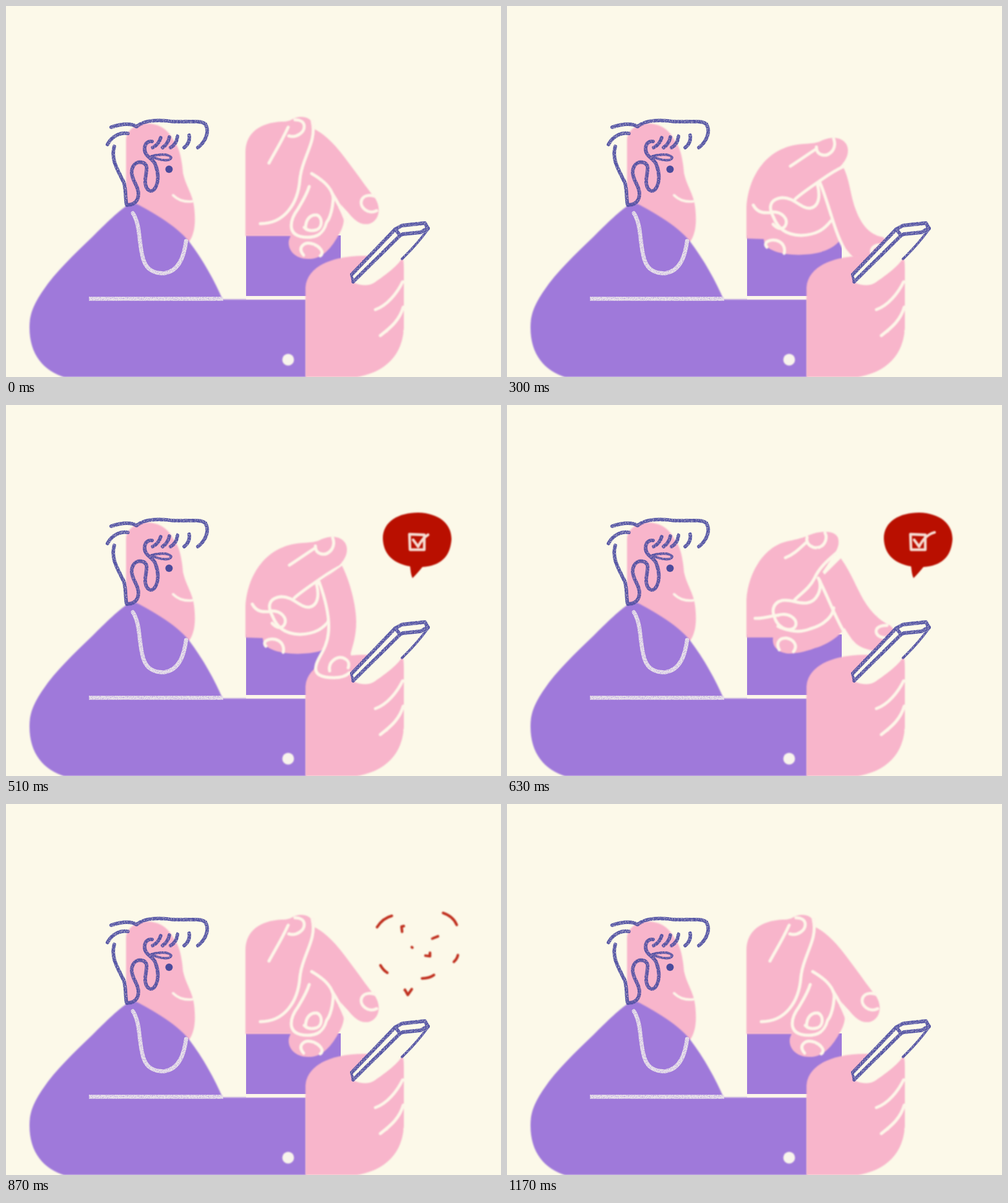
These frames come from a looping animation (800x600 px, 1.2 s). An HTML page:

```html
<!DOCTYPE html>
<html lang="en">
<head>
<meta charset="utf-8">
<title>Phone tap</title>
<style>
  html, body { margin: 0; width: 100%; height: 100%; overflow: hidden; background: #fcf9e9; }
  svg { display: block; width: 100vw; height: 100vh; }
  path { stroke-linecap: round; stroke-linejoin: round; }
  .pink { fill: #f8b5cb; }
  .purple { fill: #9f79da; }
  .paper { fill: #fcf9e9; }
  .ink { fill: none; stroke: #5252a3; stroke-width: 5.8; }
  .line { fill: none; stroke: #fdf6e9; stroke-width: 5; }
  .chalk { fill: none; stroke: #e9e3e9; stroke-width: 6.5; }
  .thin { stroke-width: 4; }
  .red { fill: #b90f00; }
  .mark { fill: none; stroke: #f6dcd2; stroke-width: 4.4; }
  .spark { fill: none; stroke: #c0301f; stroke-width: 4.6; }
</style>
</head>
<body>
<svg viewBox="0 0 800 600">
  <defs>
    <filter id="soft" filterUnits="userSpaceOnUse" x="0" y="0" width="800" height="600" color-interpolation-filters="sRGB">
      <feTurbulence type="fractalNoise" baseFrequency=".2" numOctaves="2" seed="3" result="n"/>
      <feDisplacementMap in="SourceGraphic" in2="n" scale="1.4" xChannelSelector="R" yChannelSelector="G"/>
      <feGaussianBlur stdDeviation=".9"/>
    </filter>
    <filter id="crayon" filterUnits="userSpaceOnUse" x="0" y="0" width="800" height="600" color-interpolation-filters="sRGB">
      <feTurbulence type="fractalNoise" baseFrequency=".55" numOctaves="2" seed="8" result="n"/>
      <feDisplacementMap in="SourceGraphic" in2="n" scale="1.6" xChannelSelector="R" yChannelSelector="G" result="d"/>
      <feColorMatrix in="n" values="0 0 0 0 0  0 0 0 0 0  0 0 0 0 0  1.6 0 0 0 .1" result="g"/>
      <feComposite in="d" in2="g" operator="in"/>
      <feGaussianBlur stdDeviation=".6"/>
    </filter>
  </defs>

  <!-- head -->
  <g filter="url(#soft)">
    <path class="pink" d="M194 330L194 216C195 200 210 190 230 190C248 191 262 200 270 216C280 228 284 245 286 270C290 290 302 305 304 325C307 350 305 368 296 381L250 375Z"/>
    <path class="line thin" d="M270 306Q282 318 301 316"/>
  </g>

  <!-- far arm and hand -->
  <path class="purple" d="M388 371H541V469H388Z"/>
  <g filter="url(#soft)">
    <path id="palm" class="pink"/>
    <g id="back"><g id="index">
      <path id="finger" class="pink"/>
      <path id="edge" class="line"/>
      <path id="tipNail" class="line"/>
    </g></g>
    <g id="creases"></g>
  </g>

  <!-- body and near arm -->
  <g filter="url(#soft)">
    <path class="purple" d="M200 320C184 329 160 353 140 373C110 402 80 430 60 460C43 485 38 500 38 520C38 565 62 592 100 602H485V474.500H350C338 446 318 410 296 381C278 359 250 341 215 322Q207 317 200 320Z"/>
    <circle cx="456" cy="572" r="9.500" fill="#f8f4ec"/>
  </g>
  <g filter="url(#crayon)">
    <path class="chalk" d="M205 335C218 355 214 385 222 410C228 430 245 433 257 432C280 428 288 405 291 380"/>
    <path class="chalk" style="stroke-linecap:butt" d="M134 473.500H351"/>
  </g>
  <path d="M388 472H484" class="line" style="stroke-linecap:butt"/>

  <!-- ink on the head -->
  <g class="ink" filter="url(#crayon)">
    <path d="M170 196C185 191 201 189 211 195C225 183 250 184 270 187C295 188 315 184 322 191C330 203 322 220 310 229"/>
    <path d="M164 224C170 212 183 204 197 206"/>
    <path d="M175 227C168 250 184 270 191 287C194 300 193 315 195 322C206 322 214 316 214 304C214 290 204 284 203 269C204 254 214 250 223 254C232 260 224 274 225 285C226 298 234 302 239 297C247 288 247 272 242 258C239 246 224 245 224 231C224 222 230 218 236 219"/>
    <path d="M250 213Q247 224 237 229M264 212Q262 223 253 229M277 211Q276 223 266 229M296 209Q298 221 288 229"/>
    <path class="thin" d="M235 243C246 240 262 238 267 245C266 252 250 250 236 244"/>
  </g>
  <circle id="eye" cx="263.500" cy="264" r="6" fill="#4a4a9c"/>
  <path id="lid" class="ink thin" d="M258 263Q260 270 265 270Q269 269 270 262"/>

  <!-- near hand and phone -->
  <g filter="url(#soft)">
    <path class="pink" d="M484 602V455C486 425 520 404 580 404L640 405Q643 410 643 425V520C641 565 612 598 550 602Z"/>
    <path class="line" d="M597 491C615 485 632 465 641 446M605 533C622 520 636 508 642 487"/>
  </g>
  <g id="front" filter="url(#soft)"></g>
  <path class="paper" filter="url(#soft)" d="M557 434L629 361L640 354L677 350L683 360L640 408C632 422 610 437 596 447Q582 456 561 447Z"/>
  <g class="ink" filter="url(#crayon)">
    <path d="M559 434L629 361L640 355L677 351L682 360"/>
    <path d="M561 446L637 371L629 361M637 371L641 369L670 366L682 359"/>
    <path class="thin" d="M682 361Q664 386 640 409M558 434L561 446"/>
  </g>

  <g id="bubble" filter="url(#soft)">
    <g id="grow">
      <path id="balloon" class="red"/>
      <path id="box" class="mark"/>
      <path id="tick" class="mark" pathLength="1" d="M658 218L666 229C672 217 680 209 691 206"/>
    </g>
  </g>
  <g id="burst" class="spark" filter="url(#soft)"></g>
</svg>

<script>
const LOOP = 1200, STEP = 30;
const $ = id => document.getElementById(id);

// Each shape lists its poses: raised, reaching, pressed, swiped.
const palm = [
  'M387 372C387 330 387 280 387 235C388 205 410 189 445 187C456 187 459 185 463 183C475 176 492 179 495 190C497 215 505 240 520 280C549 330 550 345 541 364C530 385 515 409 490 409C468 410 455 395 457 380C458 376 459 374 460 372Z',
  'M387 376C387 350 387 330 387 315C389 274 414 228 455 220C470 217 480 214 487 211C505 203 530 202 535 215C539 230 530 240 510 270C552 325 558 335 551 350C545 370 520 387 498 393C480 400 465 402 455 402C435 400 428 388 430 376Z',
  'M387 376C387 360 387 340 387 325C390 275 420 226 480 223C495 222 500 222 510 217C530 208 552 215 551 235C550 250 540 260 508 288C525 320 535 350 538 379C525 396 500 401 480 402C470 403 460 402 450 401C428 397 415 390 415 377Z'
];
const finger = [
  'M490 195C520 207 540 235 560 262C575 282 585 297 596 310C608 328 602 347 588 352C572 356 562 345 552 333C535 315 515 290 494 271Z',
  'M536 236C552 252 568 270 583 288C597 306 616 322 632 337C650 355 640 375 620 378C600 380 585 375 572 363C547 340 520 305 503 280Z',
  'M543 260C553 280 553 300 560 325C568 350 580 372 606 376C630 395 615 420 600 420C570 415 555 412 545 398C530 365 520 320 506 286Z',
  'M543 260C556 285 566 325 566 350C566 375 560 390 557 402C562 425 552 441 530 441C510 441 498 436 501 422C505 398 542 385 506 286Z'
];
const edge = [
  'M527 303C535 315 542 328 549 347C549 348 550 348 550 349C550 350 551 350 551 351',
  'M503 280C520 305 535 330 552 350C556 354 558 356 560 358C561 359 562 360 563 361',
  'M506 286C520 320 528 365 545 396C549 401 551 404 553 406C555 408 556 409 557 410',
  'M506 286C542 385 505 398 501 422C498 436 510 441 530 441C540 441 550 438 555 433'
];
const tipNail = [
  'M599 331C585 338 570 325 575 313C580 304 592 306 597 308',
  'M627 340C610 345 602 335 606 328C611 322 618 323 622 322',
  'M608 412C590 412 585 402 590 395C595 390 602 390 606 391',
  'M523 430C520 415 535 406 545 409C552 412 556 416 553 425'
];
const creases = [
  // thumb top
  ['M425 254C437 232 446 218 456 196', 'M450 247C465 241 475 230 485 221', 'M458 259C472 250 486 240 500 231'],
  // thumb nail
  ['M457 210C470 214 482 204 482 195C482 188 476 184 467 184', 'M485 214C482 226 495 233 505 230C515 226 518 214 514 207', 'M500 228C500 242 515 244 522 238C530 232 531 222 528 215'],
  // thumb underside
  ['M495 187C503 220 478 245 475 280C472 320 450 352 411 352', 'M535 237C520 250 505 262 497 280C490 295 475 305 465 315', 'M543 260C525 268 510 280 498 288C485 297 475 304 466 312'],
  // knuckle
  ['M494 271C515 283 527 295 529 310', 'M503 280C504 281 505 283 506 285', 'M505 286C505 287 506 288 506 289'],
  // curled finger
  ['M490 292C486 305 478 318 472 328C466 336 461 345 461 355C461 368 470 374 488 374C505 374 514 366 518 350C526 340 528 325 529 310',
   'M505 284C509 300 500 318 485 320C470 322 460 314 445 316C428 320 428 335 433 345C440 366 470 370 490 362C515 355 527 340 528 328',
   'M502 290C507 310 503 325 490 327C475 328 465 310 445 310C425 312 422 325 430 340C438 360 450 370 475 371C500 370 512 362 523 348'],
  // curled nail
  ['M484 360C484 345 492 337 502 338C512 341 512 358 502 362C495 364 489 364 484 360', 'M438 340C455 335 468 345 467 355C465 364 455 364 448 362C444 361 441 360 438 358', 'M428 333C445 332 455 345 450 355C447 361 440 361 436 358C434 357 432 355 430 353'],
  // fold
  ['M482 358C483 358 484 358 484 359', 'M401 345C415 346 430 340 438 340', 'M398 322C405 335 415 335 428 334'],
  // little finger nail
  ['M481 403C470 390 482 382 493 384C508 388 515 399 508 404', 'M440 396C434 385 440 376 452 377C465 380 470 390 463 399', 'M420 390C413 382 425 377 435 379C447 382 450 392 448 400']
];
const balloon = [
  'M620 228C618 200 640 191 668 191C698 190 715 205 714 228C712 250 700 262 673 264C668 275 660 287 654 297C652 285 653 275 652 263C632 258 621 247 620 228Z',
  'M609 216C609 188 635 174 666 174C700 175 720 192 720 217C718 246 702 260 673 262C668 268 662 275 657 280C654 273 654 267 653 261C625 256 610 241 609 216Z'
];
const box = ['M661 223L674 224L673 237L660 236Z', 'M652 209L676 210L676 234L653 234Z'];
const sparks = [
  'M594 197Q604 181 620 177', 'M710 172Q728 178 734 193', 'M600 264Q605 273 612 277',
  'M673 287Q686 287 694 281', 'M729 258Q735 252 736 246', 'M643 307L648 316L655 306',
  'M638 205L637 196L641 195', 'M691 217L701 213', 'M655 232L656 233', 'M679 247L687 248L687 242'
];

const clamp = x => Math.min(1, Math.max(0, x));
const span = (t, a, b) => clamp((t - a) / (b - a));
const ease = x => x * x * (3 - 2 * x);
const lerp = (a, b, k) => a + (b - a) * k;

// Blends neighbouring path poses number by number.
function morph(poses, p) {
  const i = Math.min(Math.floor(p), poses.length - 2), k = p - i;
  const to = poses[i + 1].match(/[\d.]+/g);
  let n = 0;
  return poses[i].replace(/[\d.]+/g, v => lerp(+v, +to[n++], k).toFixed(2));
}
const draw = (el, poses, p) => el.setAttribute('d', morph(poses, p));
const show = (el, on) => el.style.display = on ? '' : 'none';

function add(parent, cls) {
  const el = document.createElementNS('http://www.w3.org/2000/svg', 'path');
  if (cls) el.setAttribute('class', cls);
  return parent.appendChild(el);
}
const creaseEls = creases.map(() => add($('creases'), 'line'));
const sparkEls = sparks.map(d => {
  const el = add($('burst'));
  el.setAttribute('d', d);
  el.setAttribute('pathLength', 1);
  return el;
});

function drawHand(t) {
  const bend = 2 * (ease(span(t, 0, 240)) - ease(span(t, 540, 720)));
  const reach = t < 120 ? bend
    : t < 540 ? 1 + ease(span(t, 120, 330)) + ease(span(t, 390, 510))
    : 3 * (1 - ease(span(t, 540, 720)));
  draw($('palm'), palm, bend);
  draw($('finger'), finger, reach);
  draw($('edge'), edge, reach);
  draw($('tipNail'), tipNail, reach);
  creaseEls.forEach((el, i) => draw(el, creases[i], bend));
  const slot = $(reach > 2.4 ? 'front' : 'back');
  if ($('index').parentNode !== slot) slot.append($('index'));
}

function drawBubble(t) {
  show($('bubble'), t > 300 && t < 840);
  const s = span(t, 300, 390), p = ease(span(t, 390, 450)), tick = span(t, 450, 525);
  $('grow').setAttribute('transform', `translate(654 ${lerp(345, 297, s)}) scale(${s}) translate(-654 -297)`);
  draw($('balloon'), balloon, p);
  draw($('box'), box, p);
  show($('tick'), tick > 0);
  $('tick').style.strokeDasharray = `${tick} 2`;
}

function drawBurst(t) {
  show($('burst'), t >= 840 && t < 1080);
  const k = t < 930 ? lerp(.88, 1, span(t, 840, 930)) : lerp(1, 1.05, span(t, 930, 1050));
  const left = 1 - span(t, 930, 1080);
  sparkEls.forEach(el => {
    el.setAttribute('transform', `translate(665 225) scale(${k}) translate(-665 -225)`);
    el.style.strokeDasharray = `${left} 2`;
  });
}

function render(t) {
  const shut = t >= 90 && t < 180;
  show($('eye'), !shut);
  show($('lid'), shut);
  drawHand(t);
  drawBubble(t);
  drawBurst(t);
}

let last = -1;
const start = performance.now();
function tick(now) {
  const t = Math.floor(Math.max(0, now - start) % LOOP / STEP) * STEP;
  if (t !== last) render(last = t);
  requestAnimationFrame(tick);
}
render(0);
requestAnimationFrame(tick);
</script>
</body>
</html>
```
